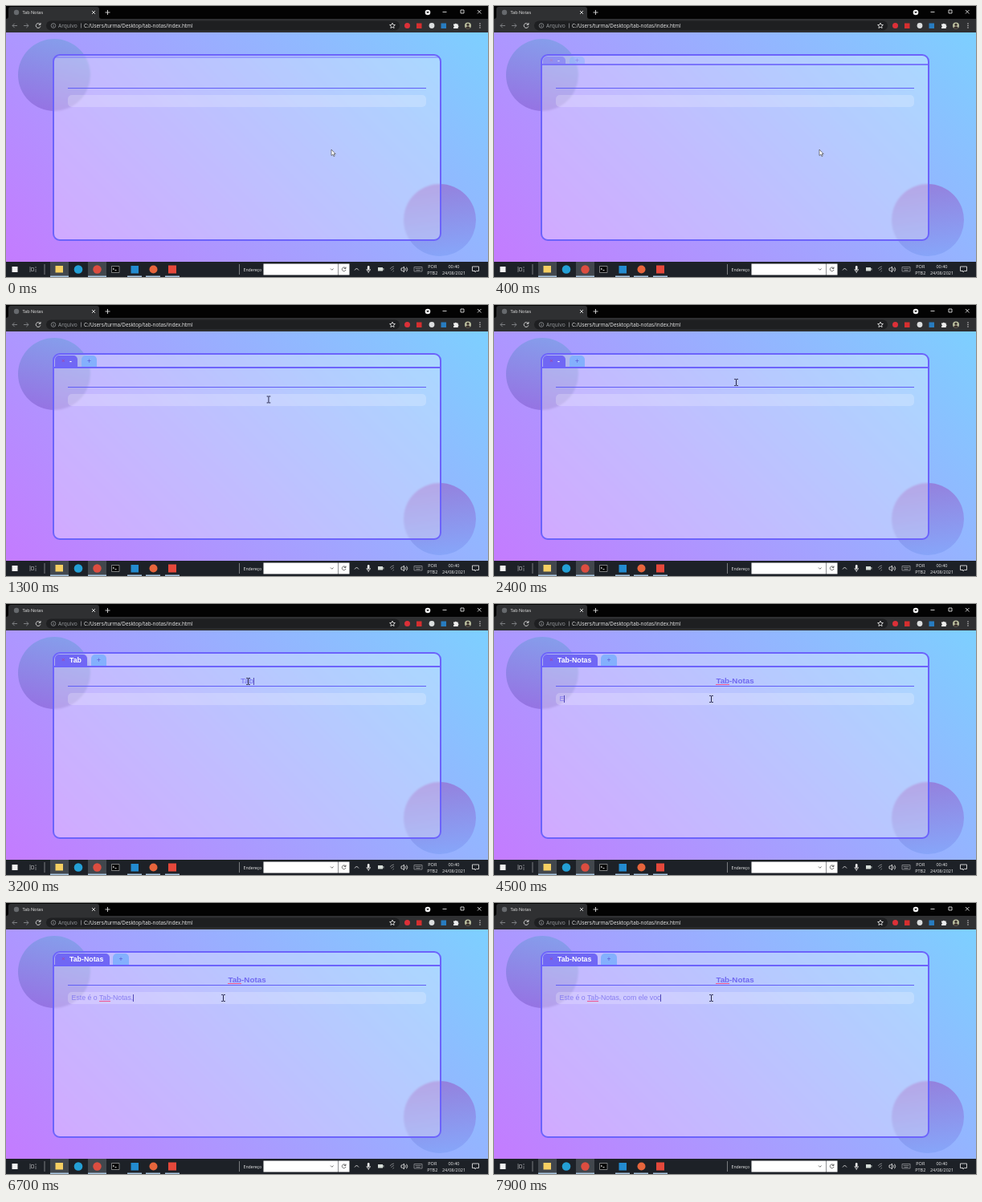
An HTML page that plays this animation: 600 by 338 pixels, repeating every 8 s.

```html
<!DOCTYPE html>
<html lang="pt">
<head>
<meta charset="utf-8">
<title>Tab Notas</title>
<style>
html, body { margin: 0; width: 100%; height: 100%; overflow: hidden; background: #000; }
body { position: relative; font-family: "Liberation Sans", Arial, sans-serif; }
body > * { position: absolute; box-sizing: border-box; }
#page { left: 0; top: 33px; width: 600px; height: 286px; background: linear-gradient(45deg, #c47bff, #7dd0ff); }
.ball { width: 90px; height: 90px; border-radius: 50%; }
#ballA { left: 15px; top: 41px; background: linear-gradient(15deg, #976fe2, #84a2ec); }
#ballB { left: 495px; top: 222px; background: linear-gradient(170deg, #957edb, #86a8fb); }
#card { left: 58px; top: 60px; width: 484px; height: 233px; border: 2px solid #6c63fb; border-radius: 9px;
  background: rgba(255,255,255,.31); backdrop-filter: blur(1.2px); }
#header { left: 60px; top: 62px; width: 480px; border-bottom: 2px solid #6c63fb; overflow: hidden;
  display: flex; padding: 1px 0 0 1px; border-radius: 7px 7px 0 0; }
.tab { display: flex; align-items: center; border-radius: 5px 5px 0 0; white-space: pre; }
#note { padding: 0 7.3px 0 8px; margin-right: 4.5px; background: #7067f4; color: #fff; font: bold 8.8px "Liberation Sans", Arial, sans-serif; }
#note i { width: 10px; font: 8px "Liberation Sans", Arial, sans-serif; color: #a8479e; }
#add { width: 19.5px; justify-content: center; background: #84b0fd; color: #5a56d6; font-size: 8.5px; }
#rule { left: 77px; top: 101.5px; width: 446px; height: 1.2px; background: #625ff6; }
#field { left: 77px; top: 111px; width: 446px; height: 15px; border-radius: 5px; background: rgba(255,255,255,.22); }
#title, #text { white-space: pre; }
#title { left: 77px; top: 90px; width: 446px; line-height: 12px; text-align: center; font-size: 9.8px; color: #7069f0; }
#text { left: 81.6px; top: 113px; line-height: 11px; font-size: 8.75px; color: #877df0; }
u { text-decoration: none; background: linear-gradient(#ee5590, #ee5590) 0 100% / 100% 1px no-repeat; }
b { display: inline-block; width: 1px; height: 9px; margin-right: -1px; vertical-align: -1.5px; background: #5148b8; }
svg { left: 0; top: 0; }
svg text { font-family: "Open Sans", "Noto Sans", sans-serif; fill: #eee; }
.line { fill: none; stroke: #ddd; stroke-width: .9; }
.dim { stroke: #85878b; }
</style>
</head>
<body>
<div id="page"></div>
<div id="ballA" class="ball"></div>
<div id="ballB" class="ball"></div>
<div id="card"></div>
<div id="header">
  <div class="tab" id="note"><i>×</i><span id="label"></span></div>
  <div class="tab" id="add">+</div>
</div>
<div id="rule"></div>
<div id="field"></div>
<div id="title"></div>
<div id="text"></div>

<svg width="600" height="338" viewBox="0 0 600 338">
  <!-- browser tab strip -->
  <path d="M0 0H600V16H0z" fill="#030303"/>
  <path d="M0 33V16Q3 16 3 13V4Q3 1 6 1H113Q116 1 116 4V13Q116 16 119 16H600V33z" fill="#2f3032"/>
  <circle cx="13" cy="8" r="3.2" fill="#66696d"/>
  <text x="20.5" y="10" font-size="5.5">Tab Notas</text>
  <path class="line" d="M107 6l4 4m0-4l-4 4M123.500 8h6m-3-3v6M543.500 7.500h5M587 5l4.500 4.500m0-4.500l-4.500 4.500M566 5h4v4h-4z"/>
  <circle cx="525" cy="8" r="3.300" fill="#f4f4f4"/>
  <path d="M523.200 7h3.600l-1.800 2.200z" fill="#111"/>

  <!-- address bar -->
  <rect x="50" y="18.500" width="440" height="12" rx="6" fill="#1e1f21"/>
  <path class="line dim" d="M14 24.500H8m2.700-2.700L8 24.500l2.700 2.700M22 24.500h6m-2.700-2.700l2.700 2.700l-2.700 2.700"/>
  <path class="line" d="M42.600 23a2.900 2.900 0 1 0 .3 2.300M43 21v2.400h-2.400"/>
  <g class="line dim"><circle cx="59" cy="24.500" r="2.800"/><path d="M59 24v2m0-3.300v.7M93.500 21.500v6"/></g>
  <text x="65" y="26.600" font-size="6.600" style="fill:#9a9da1">Arquivo</text>
  <text x="97" y="26.600" font-size="6.300">C:/Users/turma/Desktop/tab-notas/index.html</text>
  <path class="line" stroke-width=".7" d="M481 21.200l1 2.200 2.400.2-1.800 1.600.5 2.300-2.100-1.200-2.100 1.200.5-2.300-1.800-1.600 2.400-.2z"/>
  <circle cx="499.500" cy="24.500" r="3.500" fill="#dc3038"/>
  <rect x="511" y="21.500" width="6.500" height="6.500" fill="#d62f2f"/>
  <circle cx="530" cy="24.500" r="3.400" fill="#dcdedf"/>
  <rect x="541.500" y="21.500" width="6.500" height="6.500" fill="#287cc0"/>
  <path d="M557 22.500h1.700a1.200 1.200 0 0 1 2.300 0h1.700v1.700a1.200 1.200 0 0 1 0 2.300v1.500h-5.700v-1.500a1.200 1.200 0 0 0 0-2.300z" fill="#eee"/>
  <circle cx="575" cy="24.500" r="4" fill="#b9bd9e"/>
  <path d="M572 27.200q3-4 6 0q-3 2.600-6 0" fill="#3a302d"/><circle cx="575" cy="23.300" r="1.600" fill="#3a302d"/>
  <g fill="#ddd"><circle cx="590" cy="22" r=".7"/><circle cx="590" cy="24.500" r=".7"/><circle cx="590" cy="27" r=".7"/></g>

  <!-- taskbar -->
  <path d="M0 319H600V338H0z" fill="#1d2127"/>
  <path d="M55 319h23v19H55zM102 319h23v19h-23z" fill="#42474d"/>
  <path d="M55 336.500h23v1.500H55zM102 336.500h23v1.500h-23zM151 336.500h18v1.500h-18zM174 336.500h18v1.500h-18zM198 336.500h18v1.500h-18z" fill="#a9c7e2"/>
  <rect x="7.500" y="325" width="7" height="7" fill="#f2f2f2"/>
  <path class="line dim" d="M30 325v7M31.500 326.500h3v4h-3zM37 325v2m0 1v4M48 322v13M290.500 322v13"/>
  <rect x="61.500" y="324" width="9.500" height="8.500" fill="#f6cf62"/>
  <circle cx="90" cy="328.500" r="5.300" fill="#249fd5"/>
  <circle cx="113.500" cy="328.500" r="5.200" fill="#dc4d40"/>
  <path d="M131.500 324.500h9.500v8h-9.500z" fill="#050505" stroke="#aaa" stroke-width=".7"/>
  <path d="M133 327l1.500 1-1.500 1m2.500.5h2" class="line" stroke-width=".5"/>
  <rect x="155.500" y="324" width="9.500" height="9.500" fill="#238bd0"/>
  <circle cx="183.500" cy="328.500" r="5" fill="#e6653c"/>
  <rect x="202" y="323.500" width="10" height="10" fill="#e5483b"/>
  <text x="295.500" y="330.500" font-size="5.200">Endereço</text>
  <path d="M320.500 321.500h93v14h-93zM414 321.500h13.500v14H414z" fill="#fff"/>
  <path d="M404 327.500l1.800 1.800 1.800-1.800M422.700 327a2.400 2.400 0 1 0 .3 2M423 325.500v2h-2" fill="none" stroke="#444" stroke-width=".8"/>
  <path class="line" d="M434 329.500l2.500-2.500 2.500 2.500M449 328q0 3 2.200 3t2.200-3m-2.200 3v2"/>
  <rect x="449.900" y="324" width="2.600" height="5.500" rx="1.300" fill="#eee"/>
  <path d="M463 326h6v4.500h-6zM469.400 327h.9v2.500h-.9z" fill="#d6ddd8"/>
  <path class="line dim" d="M478 328a6 6 0 0 1 5-3m-3.500 5a4 4 0 0 1 3.500-2.500m-1.500 4a2 2 0 0 1 1.500-1.200M508 325.500h10v5.500h-10zM509.500 327.500h7m-6 2h5"/>
  <path class="line" d="M492 327h1.500l2-2v7l-2-2H492zm5 0q1.300 1.500 0 3m1.500-4.300q2.500 2.800 0 5.600" stroke-width=".7"/>
  <g text-anchor="middle" font-size="5.500">
    <text x="530.800" y="326.500">POR</text><text x="530.800" y="335">PTB2</text>
    <text x="557.500" y="326.500">00:40</text><text x="557.500" y="335">24/08/2021</text>
  </g>
  <path class="line" d="M580.500 325h8v5.500h-3l-1.500 1.500v-1.500h-3.500z"/>

  <!-- pointer -->
  <path id="arrow" d="M0 0V7.500L1.800 6L3 8.600L4.200 8L3 5.500H5.200z" fill="#fff" stroke="#333" stroke-width=".6"/>
  <path id="beam" d="M-2.300-4H-.6L0-3.500L.6-4H2.300M0-3.500V3.500M-2.300 4H-.6L0 3.500L.6 4H2.300" fill="none" stroke="#25254a" stroke-width="1"/>
</svg>

<script>
const $ = id => document.getElementById(id);
const LOOP = 8000, TITLE_FOCUS = 1900, TEXT_FOCUS = 4300;

// Each burst of typing: text, time of its first key, time of its last key.
const titleKeys = [["Tab", 2900, 3200], ["-Notas", 3400, 3900]];
const textKeys = [["Este é o Tab", 4500, 5500], ["-Notas", 5700, 6400], [", ", 6600, 6900],
  ["com ele", 7100, 7400], [" voc", 7600, 7900]];

// Pointer stops: time, x, y.
const pointerPath = [[1000, 405, 179], [1300, 327, 118], [1700, 301.5, 96.5],
  [3900, 301.5, 96.5], [4300, 270.5, 118.5]];

const clamp = v => Math.min(1, Math.max(0, v));

function typed(bursts, t) {
  return bursts.map(([text, first, last]) => {
    if (t < first) return "";
    return text.slice(0, 1 + Math.floor(clamp((t - first) / (last - first)) * (text.length - 1) + 1e-6));
  }).join("");
}

function pointerAt(t) {
  let i = 0;
  while (i < pointerPath.length - 2 && t > pointerPath[i + 1][0]) i++;
  const [t0, x0, y0] = pointerPath[i], [t1, x1, y1] = pointerPath[i + 1];
  const k = clamp((t - t0) / (t1 - t0));
  return [x0 + (x1 - x0) * k, y0 + (y1 - y0) * k];
}

// The spelling checker marks the word once the caret has left it.
const markup = (text, caret) => text.replace(/Tab(?=-)/, "<u>Tab</u>") + (caret ? "<b></b>" : "");

function draw(t) {
  const open = 1 - (1 - clamp(t / 900)) ** 2;
  $("header").style.height = 3 + 13.5 * open + "px";
  $("header").style.borderColor = `rgba(108,99,251,${0.4 + 0.6 * open})`;
  $("note").style.opacity = $("add").style.opacity = open * open;

  const title = typed(titleKeys, t);
  const titleFocus = t >= TITLE_FOCUS && t < TEXT_FOCUS;
  const blinkOff = t >= 2400 && t < 2900;
  $("label").textContent = title || "-";
  $("title").innerHTML = markup(title, titleFocus && !blinkOff);
  $("title").style.fontWeight = titleFocus ? 400 : 700;
  $("text").innerHTML = markup(typed(textKeys, t), t >= TEXT_FOCUS);

  const [x, y] = pointerAt(t);
  const overInput = y < 103 || (y > 111 && y < 126);
  for (const [id, shown] of [["beam", overInput], ["arrow", !overInput]]) {
    $(id).setAttribute("transform", `translate(${x} ${y})`);
    $(id).style.display = shown ? "" : "none";
  }
}

const start = performance.now();
function tick() {
  draw((performance.now() - start) % LOOP);
  requestAnimationFrame(tick);
}
tick();
</script>
</body>
</html>
```
